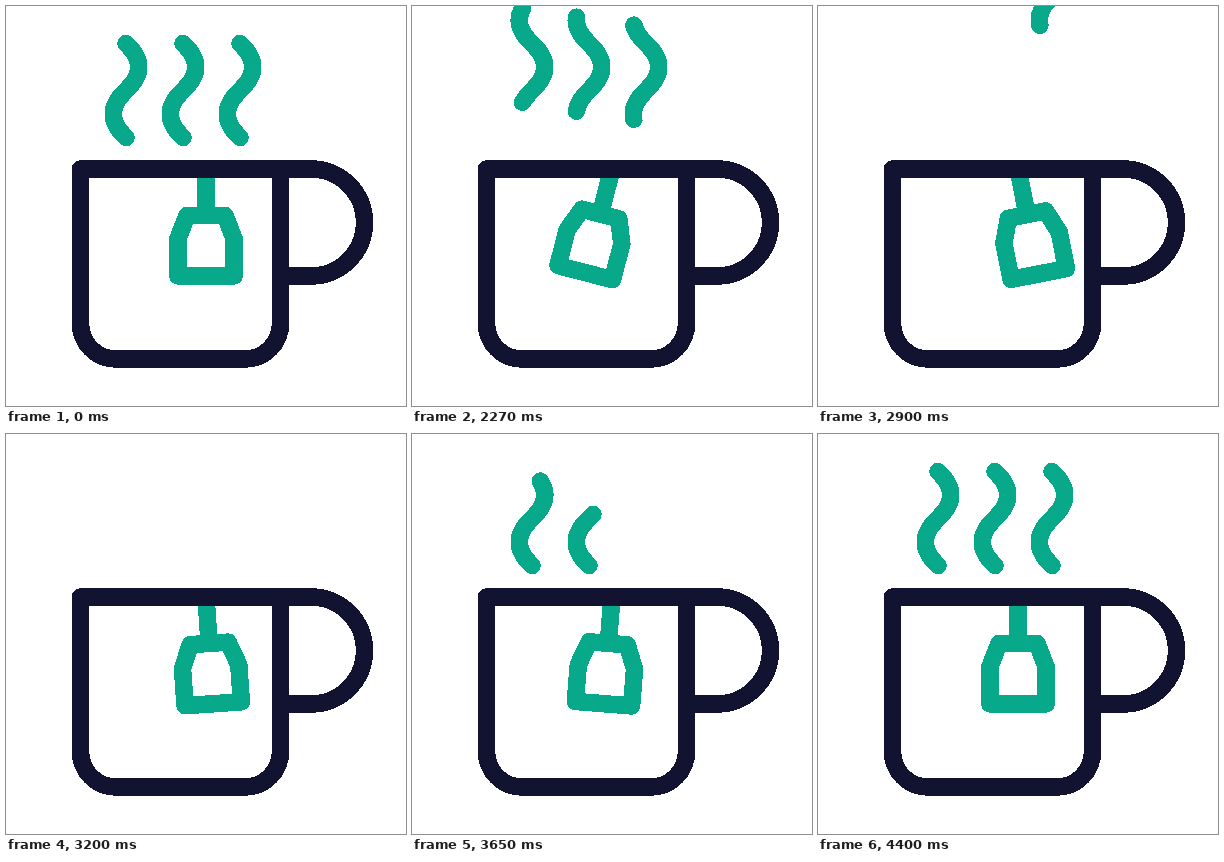
An HTML page for the animation above (4430 ms loop, 400 px wide and 400 px high).

```html
<!DOCTYPE html>
<html lang="en">
<head>
<meta charset="utf-8">
<title>Cup of tea</title>
<style>
  html, body { margin: 0; height: 100%; overflow: hidden; background: #fff; }
  svg { display: block; width: 100%; height: 100%; shape-rendering: crispEdges; }
  path { fill: none; stroke-width: 17.5; stroke-linecap: round; stroke-linejoin: round; }
  .teal { stroke: #08a88a; }
  .navy { stroke: #121331; }
</style>
</head>
<body>
<svg viewBox="0 0 400 400">
  <g id="steam" class="teal"></g>
  <path id="tag" class="teal" d="M200 163V209.5M181 209.5H219L228.2 233V270H171.8V233Z"/>
  <path class="navy" d="M74.5 163H274.5V317.5a35.5 35.5 0 0 1-35.5 35.5H110a35.5 35.5 0 0 1-35.5-35.5ZM274.5 163H305a53.5 53.5 0 0 1 0 107H274.5"/>
</svg>
<script>
const LOOP = 4430, START = 2030, END = 4400, STEP = 30;
const WAVE = 94; // visible height of one steam line

// Tag swing: [time, degrees]
const swing = [[1995, 0], [2450, 21.9], [2970, -12.7], [3500, 9.6], [3890, -6], [4390, 0]];

// Steam lines: speed of the rise, then start and end of regrowth
const lines = [
  { x: 120, speed: 236, from: 3205, to: 3775 },
  { x: 177, speed: 180, from: 3320, to: 3940 },
  { x: 234, speed: 132, from: 3655, to: 4310 },
];

const ease = (t, from, to) => {
  const p = Math.min(1, Math.max(0, (t - from) / (to - from)));
  return (1 - Math.cos(Math.PI * p)) / 2;
};

const steam = document.getElementById("steam");
const tag = document.getElementById("tag");
for (const line of lines) {
  line.path = document.createElementNS("http://www.w3.org/2000/svg", "path");
  line.path.setAttribute("d", `M${line.x} 131.5` + "c-17-16-17-31 0-47c17-16 17-31 0-47".repeat(3));
  line.path.setAttribute("pathLength", WAVE * 3);
  steam.append(line.path);
}

function angleAt(t) {
  let angle = 0;
  for (let i = 1; i < swing.length; i++) {
    const [t0, a0] = swing[i - 1], [t1, a1] = swing[i];
    if (t >= t0) angle = a0 + (a1 - a0) * ease(t, t0, t1);
  }
  return angle;
}

function drawLine({ path, speed, from, to }, t, moving) {
  let shift = 0, length = WAVE;
  if (moving) {
    if (t < from) shift = speed * ((t - 2000) / 1000) ** 1.48;
    else length = WAVE * ease(t, from, to);
  }
  path.style.display = length > 0.1 && shift < 145 ? "" : "none";
  path.setAttribute("stroke-dasharray", `${length} 999`);
  path.setAttribute("stroke-dashoffset", -shift);
}

function draw(now) {
  const time = now % LOOP;
  const moving = time >= START && time < END;
  const t = START + Math.floor((time - START) / STEP) * STEP;
  tag.setAttribute("transform", `rotate(${moving ? angleAt(t) : 0} 200 163)`);
  for (const line of lines) drawLine(line, t, moving);
}

const origin = performance.now();
function tick() {
  draw(performance.now() - origin);
  requestAnimationFrame(tick);
}
tick();
</script>
</body>
</html>
```
